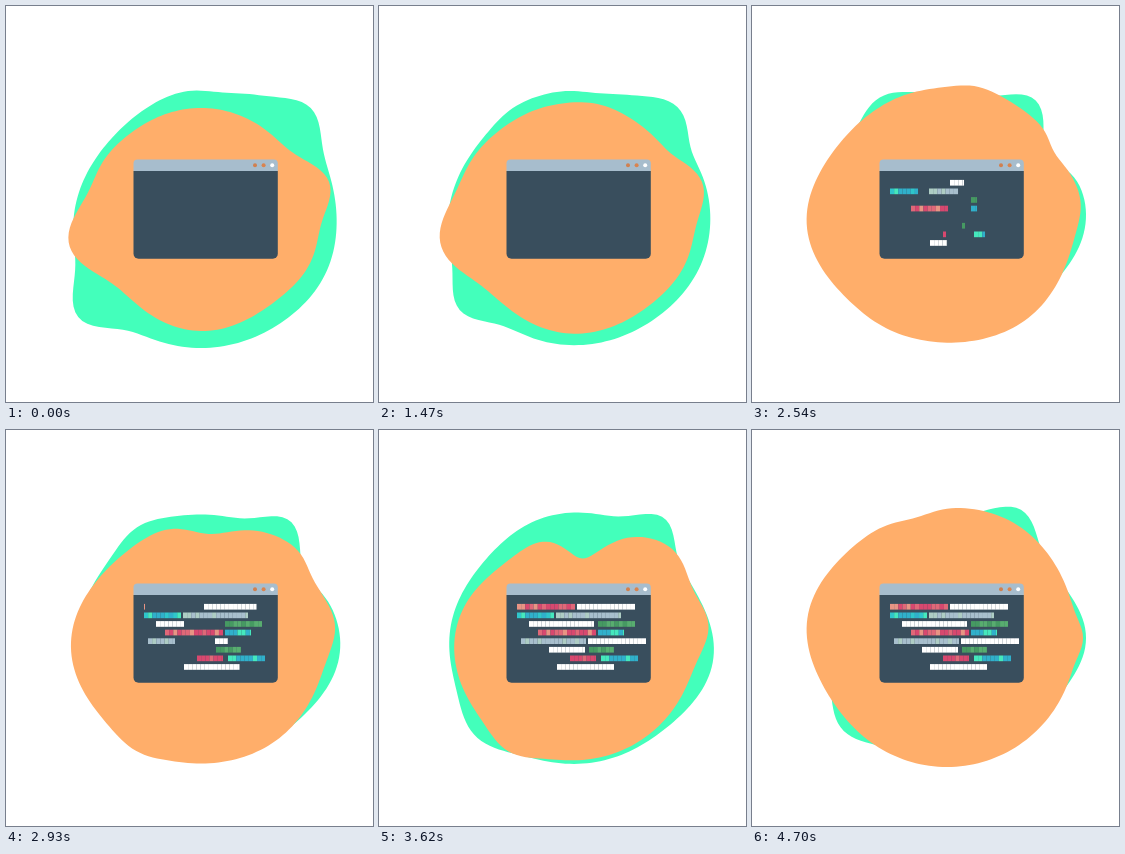
Animation of 367x396 px, one loop 4790 ms. Source, as an HTML page with a canvas:

```html
<!DOCTYPE html>
<html lang="en">
<head>
<meta charset="utf-8">
<title>Code window</title>
<style>
  html, body { margin: 0; width: 100%; height: 100%; overflow: hidden; background: #fff; }
  canvas { display: block; width: 367px; height: 396px; }
</style>
</head>
<body>
<canvas id="stage"></canvas>
<script>
const W = 367, H = 396, CX = 195, CY = 208;
const LOOP = 4790, HOLD = 1160, STEP = 76.96, LAST = 46;
const MORPH_START = 1100, MORPH = 1200;
const TYPE_SPEED = 0.1, CELL = 4.15;

// A pose is a circle with bumps: [angle clockwise from the right, height, width].
const orange = {
  color: '#ffae6a',
  poses: [
    { r: 106, bumps: [[167, 29, 19], [346, 23, 15], [20, 13, 28], [88, 11, 40], [205, 5, 20]] },
    { r: 129, bumps: [[175, 14, 28], [282, 7, 14], [355, 5, 12], [52, 4, 25], [330, -6, 9]] },
    { r: 122, bumps: [[277, -38, 18], [232, -21, 38], [320, 11, 16], [354, 13, 14], [120, 9, 14]] },
    { r: 129, bumps: [[188, 12, 27], [0, 7, 9], [300, 4, 28], [255, -5, 12]] }
  ]
};
const green = {
  color: '#43ffbb',
  poses: [
    { r: 134, bumps: [[140, 27, 13], [225, -17, 48], [280, -6, 14], [316, 19, 13], [25, 4, 25]] },
    { r: 121, bumps: [[0, 18, 30], [329, -14, 11], [307, 22, 13], [240, 15, 15], [135, -13, 20]] },
    { r: 126, bumps: [[10, 15, 27], [135, 13, 17], [220, -8, 30], [307, 24, 12]] },
    { r: 123, bumps: [[0, 16, 22], [139, 16, 15], [300, 25, 14]] }
  ]
};

const inks = {
  white: ['#ffffff'],
  pink: ['#d8486f', '#d8486f', '#e06878', '#e89484'],
  blue: ['#30b0cb', '#30b0cb', '#2fc6cb', '#45e8bd'],
  grey: ['#a8bfcd', '#a8bfcd', '#a8bfcd', '#aecdc4'],
  green: ['#469a62', '#469a62', '#58ad6f']
};

// Bars of each code line: x, width, typing start, ink
const lines = [
  [[138, 58, 2920, 'pink'], [198, 58, 2405, 'white']],
  [[138, 37, 2265, 'blue'], [177, 65, 2255, 'grey']],
  [[150, 65, 2650, 'white'], [219, 37, 2485, 'green']],
  [[159, 58, 2175, 'pink'], [219, 26, 2485, 'blue']],
  [[142, 65, 2660, 'grey'], [209, 58, 2800, 'white']],
  [[170, 36, 3025, 'white'], [210, 25, 2515, 'green']],
  [[191, 26, 2515, 'pink'], [222, 37, 2435, 'blue']],
  [[178, 57, 2375, 'white']]
];

const ctx = document.getElementById('stage').getContext('2d');
const dpr = window.devicePixelRatio || 1;
ctx.canvas.width = W * dpr;
ctx.canvas.height = H * dpr;
ctx.scale(dpr, dpr);

const clamp = (v, lo, hi) => Math.min(Math.max(v, lo), hi);
const ease = u => (1 - Math.cos(Math.PI * u)) / 2;

// Repeatable value in 0..1
function noise(seed) {
  const v = Math.sin(seed * 12.9898) * 43758.5453;
  return v - Math.floor(v);
}

function radius({ r, bumps }, deg) {
  return bumps.reduce((sum, [at, height, width]) => {
    const d = (deg - at + 540) % 360 - 180;
    return sum + height * Math.exp(-((d / width) ** 2));
  }, r);
}

function drawBlob({ color, poses }, t) {
  const pos = clamp((t - MORPH_START) / MORPH, 0, poses.length - 1);
  const i = Math.min(Math.floor(pos), poses.length - 2);
  const mix = ease(pos - i);
  ctx.beginPath();
  for (let deg = 0; deg < 360; deg += 2) {
    const r = radius(poses[i], deg) * (1 - mix) + radius(poses[i + 1], deg) * mix;
    const a = deg * Math.PI / 180;
    ctx.lineTo(CX + r * Math.cos(a), CY + r * Math.sin(a));
  }
  ctx.fillStyle = color;
  ctx.fill();
}

function drawPanel(y, h, radii, color) {
  ctx.beginPath();
  ctx.roundRect(127.5, y, 144.3, h, radii);
  ctx.fillStyle = color;
  ctx.fill();
}

function drawWindow() {
  drawPanel(165, 87.8, [0, 0, 5, 5], '#394e5d');
  drawPanel(153.6, 11.4, [4, 4, 0, 0], '#a7bdcd');
  ['#d08050', '#d98450', '#ffffff'].forEach((color, i) => {
    ctx.beginPath();
    ctx.arc(249 + i * 8.6, 159.2, 2, 0, Math.PI * 2);
    ctx.fillStyle = color;
    ctx.fill();
  });
}

function drawBar([x, w, start, ink], row, t) {
  const shown = clamp((t - start) * TYPE_SPEED, 0, w);
  const shades = inks[ink];
  for (let a = 0; a < shown; a += CELL) {
    const pick = noise(x + row * 31 + a);
    ctx.fillStyle = shades[Math.floor(pick * shades.length)];
    ctx.fillRect(x + a, 173.9 + row * 8.6, Math.min(CELL, shown - a), 5.7);
  }
}

function draw(ms) {
  const tick = clamp(Math.floor((ms - HOLD + 5) / STEP), -1, LAST);
  const t = HOLD + tick * STEP;
  ctx.fillStyle = '#fff';
  ctx.fillRect(0, 0, W, H);
  drawBlob(green, t);
  drawBlob(orange, t);
  drawWindow();
  lines.forEach((bars, row) => bars.forEach(bar => drawBar(bar, row, t)));
}

const begin = performance.now();
function frame() {
  draw((performance.now() - begin) % LOOP);
  requestAnimationFrame(frame);
}
frame();
</script>
</body>
</html>
```
